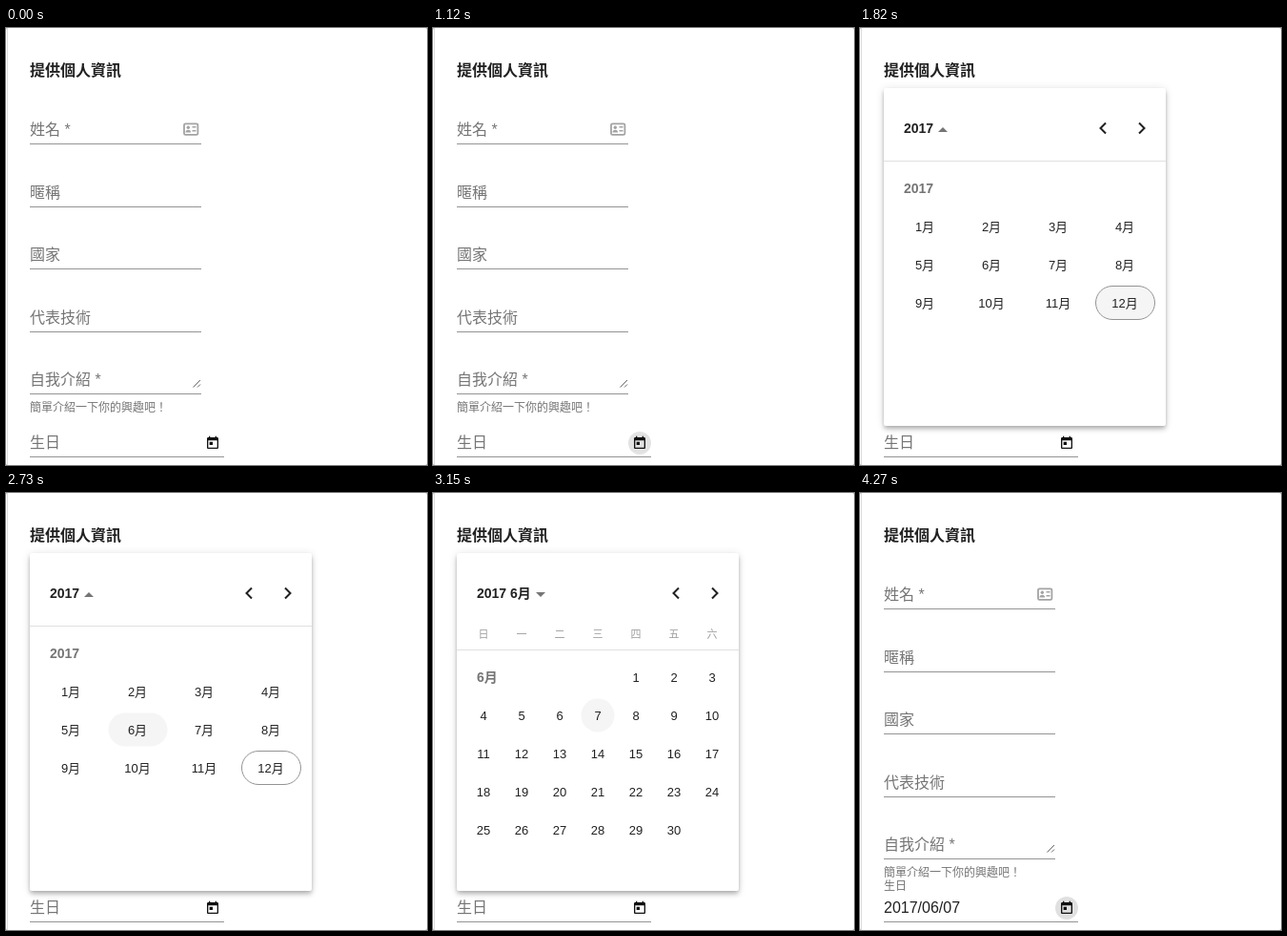
Animation, 442 px wide and 458 px high, one loop 5.04 s. Source, as an HTML page:

```html
<!DOCTYPE html>
<html lang="zh-TW">
<head>
<meta charset="utf-8">
<style>
  html, body { margin: 0; width: 100%; height: 100%; overflow: hidden; background: #bbb; }
  body { position: relative; }
  svg { position: absolute; left: 0; top: 0; width: 442px; height: 458px; }
  #panel {
    position: absolute; left: 25px; top: 63px; width: 296px; height: 354px;
    background: #fff; border-radius: 2px;
    box-shadow: 0 2px 4px -1px rgba(0,0,0,.2), 0 4px 5px rgba(0,0,0,.14), 0 1px 10px rgba(0,0,0,.12);
  }
  #panel svg { left: -25px; top: -63px; }
  text { font: 16px "Liberation Sans", "Noto Sans CJK TC", "Noto Sans CJK JP", "Noto Sans CJK", sans-serif; fill: #212121; }
  .label { fill: #757575; }
  .small { font-size: 12px; fill: #757575; }
  .bold { font-weight: bold; }
  .head { font-size: 14px; font-weight: bold; }
  .cell { font-size: 13px; text-anchor: middle; }
  .day { font-size: 11px; text-anchor: middle; fill: #9e9e9e; }
  .hover { fill: #f5f5f5; }
  .rule { stroke: #949494; }
  .divider { stroke: #e0e0e0; }
</style>
</head>
<body>
<svg id="form"></svg>
<div id="panel">
  <svg>
    <path d="M258 99.5L252.5 105L258 110.5M293 99.5L298.5 105L293 110.5" fill="none" stroke="#212121" stroke-width="2"/>
    <g id="year"></g>
    <g id="month"></g>
  </svg>
</div>
<script>
const LOOP = 5040;
const $ = id => document.getElementById(id);
const text = (x, y, cls, s) => `<text x="${x}" y="${y}" class="${cls}">${s}</text>`;
const line = (x1, x2, y, cls) => `<path d="M${x1} ${y}H${x2}" class="${cls}"/>`;
const pill = (id, x, y, attrs) =>
  `<rect id="${id}" x="${x}" y="${y}" width="62" height="35" rx="17.5" ${attrs}/>`;

const fields = ['姓名 *', '暱稱', '國家', '代表技術', '自我介紹 *'];
const baselines = [112, 178, 243, 309, 374];

$('form').innerHTML = `
  <rect width="442" height="458" rx="2" fill="#fff"/>
  <path d="M1.5 0V458" stroke="#dcdcdc"/>
  ${text(25, 50, 'bold', '提供個人資訊')}
  ${fields.map((s, i) => text(25, baselines[i], 'label', s) + line(25, 205, baselines[i] + 9.5, 'rule')).join('')}
  <g fill="#a3a3a3">
    <rect x="187" y="100.3" width="14.4" height="11.6" rx="1.5" fill="none" stroke="#a3a3a3" stroke-width="1.8"/>
    <circle cx="191.3" cy="104.2" r="1.7"/>
    <path d="M188.5 109.5q0-2.8 2.8-2.8t2.8 2.8zM195.5 103h4v1.5h-4zM195.5 107h4v1.5h-4z"/>
  </g>
  <path d="M196.5 376.5L204 369M201 376.5L204 373.5" stroke="#666"/>
  ${text(25, 401.5, 'small', '簡單介紹一下你的興趣吧！')}
  <g id="empty">${text(25, 440, 'label', '生日')}</g>
  <g id="filled">${text(25, 416, 'small', '生日') + text(25, 440, '', '2017/06/07')}</g>
  ${line(25, 229, 449.5, 'rule')}
  <circle id="ripple" cx="217" cy="435" r="12"/>
  <path transform="translate(209 427) scale(.667)" fill="#111" d="M19 3h-1V1h-2v2H8V1H6v2H5c-1.1 0-2 .9-2 2v14c0 1.1.9 2 2 2h14c1.1 0 2-.9 2-2V5c0-1.1-.9-2-2-2zm0 16H5V8h14v11zM7 10h5v5H7z"/>`;

let months = '', days = '';
for (let m = 0; m < 12; m++)
  months += text(68 + m % 4 * 70, 213 + (m >> 2) * 40, 'cell', m + 1 + '月');
for (let d = 1; d <= 30; d++) {
  const slot = d + 3; // the month begins on a Thursday
  days += text(53 + slot % 7 * 40, 198 + Math.floor(slot / 7) * 40, 'cell', d);
}

$('year').innerHTML =
  text(46, 110, 'head', '2017') +
  '<path d="M82 109h10l-5-5z" fill="#757575"/>' +
  line(25, 321, 139.5, 'divider') +
  text(46, 173, 'head label', '2017') +
  pill('june', 107.5, 230.5, 'class="hover"') +
  pill('december', 247.5, 270.5, 'stroke="#949494"') +
  months;

$('month').innerHTML =
  text(46, 110, 'head', '2017 6月') +
  '<path d="M108 104h10l-5 5z" fill="#757575"/>' +
  [...'日一二三四五六'].map((s, i) => text(53 + i * 40, 152, 'day', s)).join('') +
  line(25, 321, 164.5, 'divider') +
  text(46, 198, 'head label', '6月') +
  '<circle cx="173" cy="233" r="17.5" class="hover"/>' +
  days;

// [time, opacity] of the round highlight behind the calendar button
const highlight = [
  [0, 0], [560, .02], [630, .04], [1050, .08], [1120, .11], [1190, .06],
  [1260, .04], [1610, .02], [1680, 0], [3640, .12]
];
const show = (id, on) => { $(id).style.display = on ? '' : 'none'; };

function draw() {
  const t = performance.now() % LOOP;
  show('panel', t >= 1190 && t < 3640);
  show('year', t < 2940);
  show('month', t >= 2940);
  show('june', t >= 2030);
  $('december').setAttribute('fill', t < 2730 ? '#f5f5f5' : '#fff');
  show('empty', t < 3640);
  show('filled', t >= 3640);
  $('ripple').style.opacity = highlight.filter(k => k[0] <= t).pop()[1];
  requestAnimationFrame(draw);
}
draw();
</script>
</body>
</html>
```
